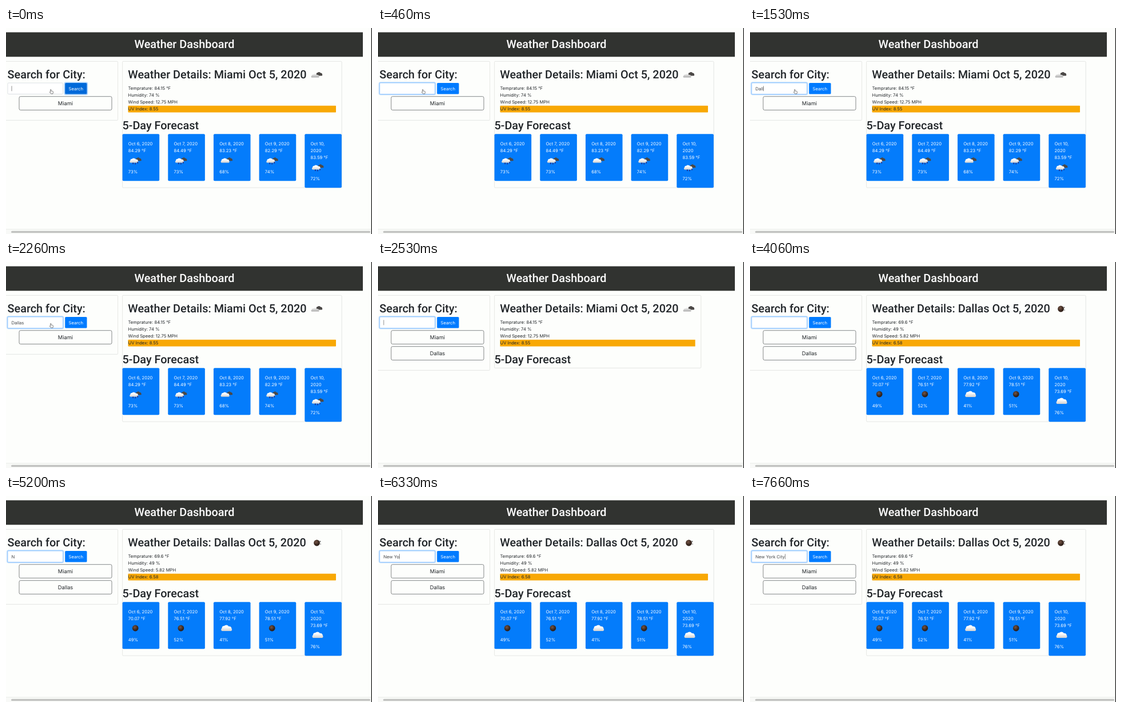
Animation, 640 px wide and 360 px high, one loop 8000 ms. Source, as an HTML page:

```html
<!DOCTYPE html>
<html lang="en">
<head>
<meta charset="utf-8">
<title>Weather Dashboard</title>
<style>
html, body { margin: 0; width: 100%; height: 100%; overflow: hidden; background: #fdfefc; }
svg { display: block; }
text { font: 7.65px Inter, sans-serif; fill: #212529; white-space: pre; text-rendering: geometricPrecision; }
.h { font: 500 19.85px Roboto, sans-serif; }
.city { font-size: 9.3px; }
.mid { text-anchor: middle; }
.w { fill: #fff; }
</style>
</head>
<body>
<svg id="stage" width="640" height="360" viewBox="0 0 640 360"></svg>
<script>
const LOOP = 8000;
const stage = document.getElementById('stage');

const cities = {
  Miami: {
    facts: ['84.15', '74', '12.75'], uv: '8.55', icon: 'broken',
    days: [['84.29', 73, 'rain'], ['84.49', 73, 'rain'], ['83.23', 68, 'broken'], ['82.29', 74, 'rain'], ['83.59', 72, 'rain']]
  },
  Dallas: {
    facts: ['69.6', '49', '5.82'], uv: '6.58', icon: 'moon',
    days: [['70.07', 49, 'moon'], ['76.51', 52, 'moon'], ['77.92', 41, 'cloud'], ['78.51', 51, 'moon'], ['73.69', 76, 'cloud']]
  }
};

// Key times in ms
const typing = [
  ['Dallas', [1000, 1200, 1400, 1530, 1660, 1800]],
  ['New York City', [4730, 5400, 5600, 5730, 6060, 6330, 6460, 6660, 6860, 7130, 7260, 7460, 7660]]
];
const blinks = [460, 930, 2260, 2530, 3060, 3530, 4060, 4530, 5200, 5400];
const SUBMIT = 2530, DETAILS = 2660, FORECAST = 2730, ICONS = 2860, UV = 2930;

const text = (x, y, s, cls = '') => `<text x="${x}" y="${y}" class="${cls}">${s}</text>`;
const rect = (x, y, w, h, fill, r = 0, extra = '') =>
  `<rect x="${x}" y="${y}" width="${w}" height="${h}" rx="${r}" fill="${fill}" ${extra}/>`;
const frame = (x, y, w, h) => rect(x, y, w, h, 'none', 1.5, 'stroke="#dfe0de" stroke-width=".8"');
const glow = (x, w, k) =>
  rect(x - .8, 95.2, w + 1.6, 21.1, 'none', 2.4, `stroke="#80bdff" stroke-opacity="${.6 * k}" stroke-width="1.8"`);

const puff = (x, y, sx, sy, fill) =>
  `<path transform="translate(${x} ${y}) scale(${sx} ${sy})" fill="${fill}"
    d="M-8 5a3 3 0 0 1 0-5a4 4 0 0 1 4-4a5 5 0 0 1 8 1a4 4 0 0 1 5 4a2.5 2.5 0 0 1-1 4z"/>`;
const drop = (x, y) => `<ellipse cx="${x}" cy="${y}" rx="1" ry="1.6" fill="#25348e"/>`;
const icons = {
  cloud: () => puff(0, 0, 1, 1, 'url(#white)'),
  broken: () => puff(5.3, -1.6, .55, .55, '#4b4846') + puff(-2.5, .8, .8, .75, 'url(#white)'),
  rain: () => icons.broken() + drop(-4, 5.6) + drop(0, 6) + drop(4, 4.2),
  moon: () => '<circle r="5.4" fill="url(#brown)"/>'
};
const icon = (name, x, y) => `<g transform="translate(${x} ${y})">${icons[name]()}</g>`;

const defs = `<defs>
  <linearGradient id="white" x2="0" y2="1"><stop offset=".3" stop-color="#fff"/><stop offset="1" stop-color="#cfcfcf"/></linearGradient>
  <linearGradient id="grey" x2="0" y2="1"><stop stop-color="#f0f0ef"/><stop offset="1" stop-color="#aaa"/></linearGradient>
  <radialGradient id="brown" cx=".4" cy=".35"><stop stop-color="#765646"/><stop offset="1" stop-color="#32221b"/></radialGradient>
</defs>`;

const chrome = rect(0, 0, 640, 360, '#fdfefc') + rect(0, 7.5, 624, 42.8, '#313330') +
  text(312, 34.5, 'Weather Dashboard', 'h mid w') +
  rect(0, 351.5, 638, 8.5, '#f8f9f7') + rect(0, 351.5, 638, .6, '#e3e4e2') +
  rect(9, 354.7, 628, 3.4, '#c0c1bf', 1.7) + rect(638.7, 0, 1.3, 360, '#222');

const hand = `<path d="M77.6 112.2V107.8q.7-1 1.4 0v2.2l2.8.6q.9.3.7 1.4l-.6 3h-3.2l-2.4-2.8q.3-.9 1.3 0z"
  fill="#fff" stroke="#333" stroke-width=".6"/>`;

function typed(t) {
  const [word, keys] = typing[t < SUBMIT ? 0 : 1];
  return word.slice(0, keys.filter(k => k <= t).length);
}

function search(t) {
  const k = Math.min(1, Math.max(0, (t - 60) / 200));
  const names = t < SUBMIT ? ['Miami'] : ['Miami', 'Dallas'];
  return frame(-4, 58.3, 199.6, 75 + 28 * names.length) +
    text(2.5, 88, 'Search for City:', 'h') +
    glow(3, 96.5, k) +
    rect(3, 96, 96.5, 19.5, '#fff', 1.6, `stroke="${k > .4 ? '#80bdff' : '#ced4da'}" stroke-width=".7"`) +
    glow(103.2, 38.3, 1 - k) +
    rect(103.2, 96, 38.3, 19.5, k < .5 ? '#0069d9' : '#007bff', 1.6) +
    text(122.3, 108.7, 'Search', 'mid w') +
    `<text id="field" x="9.5" y="108.7" fill-opacity=".85">${typed(t)}</text>` +
    names.map((n, i) =>
      rect(23, 119.7 + 28 * i, 162, 23.7, '#fdfefc', 2.4, 'stroke="#666a6b" stroke-width=".8"') +
      text(104, 134.9 + 28 * i, n, 'city mid')).join('');
}

function card([temp, humidity, pic], i, loaded) {
  const x = 203.6 + 79.68 * i, last = i === 4;
  const gap = loaded || pic === 'moon' ? 0 : 13;
  const dy = last ? 12 : 0;
  const date = last ? ['Oct 10,', '2020'] : [`Oct ${6 + i}, 2020`];
  return rect(x, 185.2, 64.6, 82 + dy - gap, '#047cfb', 2) +
    [...date, temp + ' °F'].map((s, n) => text(x + 10.2, 204.7 + 12 * n, s, 'w')).join('') +
    (gap ? '' : icon(pic, x + 22.6, 231 + dy)) +
    text(x + 10.2, 253.7 + dy - gap, humidity + '%', 'w');
}

function details(t) {
  const name = t < DETAILS ? 'Miami' : 'Dallas', city = cities[name];
  const empty = t >= SUBMIT && t < FORECAST;
  const loaded = t < SUBMIT || t >= ICONS;
  const width = empty ? 361.2 : 383.5;
  const [temp, humidity, wind] = city.facts;
  const uv = t < UV ? cities.Miami.uv : city.uv;
  const pic = city.icon === 'moon'
    ? icon('moon', 543.5, 82) + '<g fill="#444"><circle cx="549.5" cy="79.5" r=".9"/><circle cx="550" cy="84" r=".7"/></g>'
    : puff(547.5, 80.4, .6, .6, '#4b4846') + puff(540.5, 83.6, .75, .6, 'url(#grey)');
  return frame(203.6, 58.3, width, empty ? 127 : loaded ? 220.7 : 208.8) +
    text(213.3, 88, `Weather Details: ${name} Oct 5, 2020`, 'h') + pic +
    rect(213.5, 135.8, width - 20, 11.7, '#f8a805', empty ? 0 : .8) +
    [`Temprature: ${temp} °F`, `Humidity: ${humidity} %`, `Wind Speed: ${wind} MPH`, `UV Index: ${uv}`]
      .map((s, i) => text(213.5, 108.2 + 12 * i, s)).join('') +
    text(203.6, 177.2, '5-Day Forecast', 'h') +
    (empty ? '' : city.days.map((d, i) => card(d, i, loaded)).join(''));
}

function caret(t) {
  if (blinks.filter(b => b <= t).length % 2) return;
  const x = 9.7 + document.getElementById('field').getComputedTextLength();
  stage.insertAdjacentHTML('beforeend', rect(x, 101.3, .6, 9, '#444'));
}

let shown = '';
function draw(now) {
  const t = now % LOOP;
  const on = blinks.filter(b => b <= t).length;
  const html = defs + chrome + search(t) + details(t) + (t < SUBMIT ? hand : '');
  if (html + on !== shown) {
    stage.innerHTML = html;
    caret(t);
    shown = html + on;
  }
}

const start = performance.now();
function tick() {
  draw(performance.now() - start);
  requestAnimationFrame(tick);
}
tick();
</script>
</body>
</html>
```
